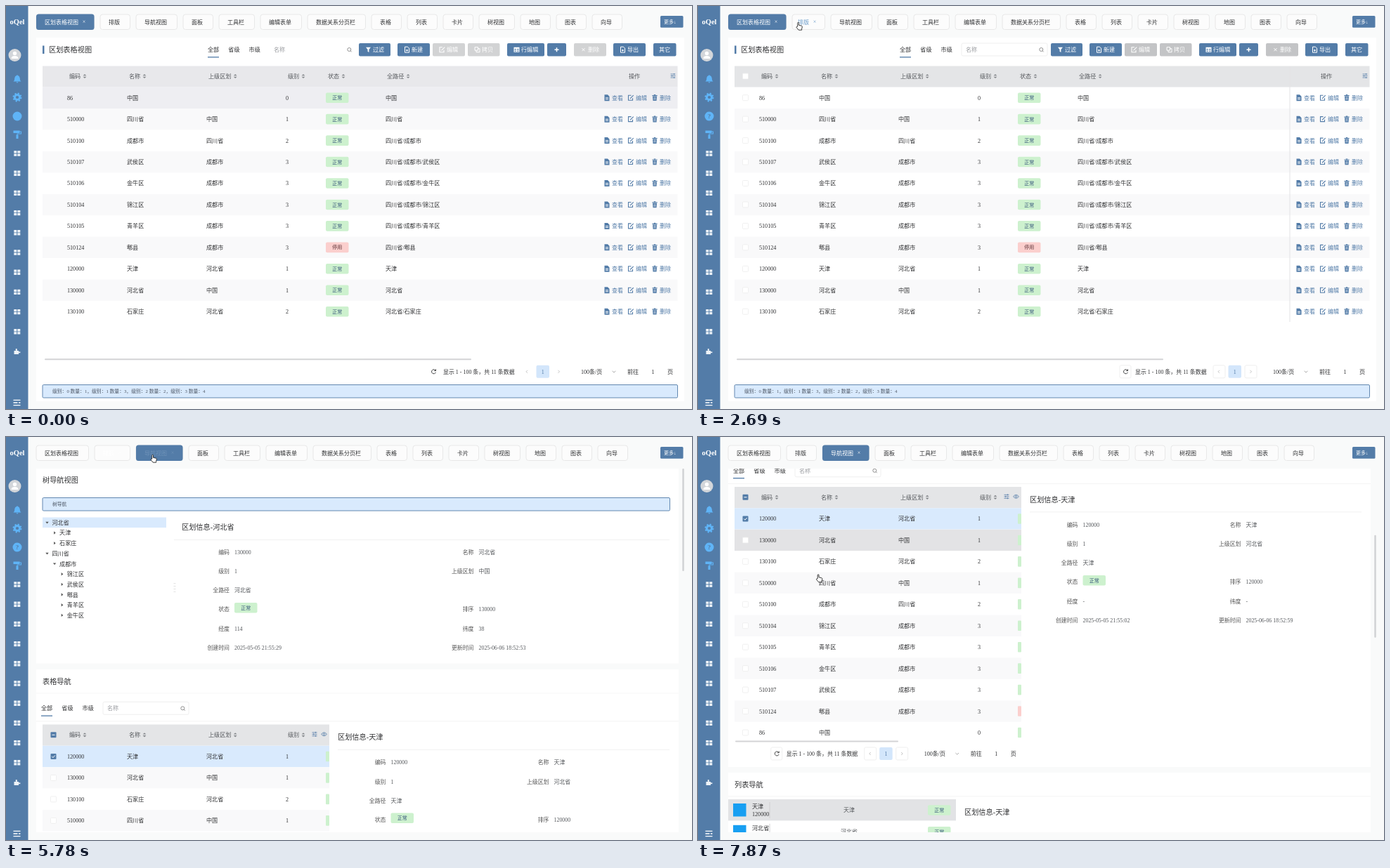
These frames come from a looping animation (976 px wide and 574 px high, 8 s). An HTML page:

```html
<!DOCTYPE html>
<html lang="zh-CN">
<head>
<meta charset="utf-8">
<title>区划管理</title>
<style>
html, body { margin: 0; width: 100%; height: 100%; overflow: hidden; background: #f9fafa; }
svg { display: block; width: 976px; height: 574px; font-family: "Liberation Serif", "Noto Sans CJK SC", "Noto Sans CJK", serif; }
text { white-space: pre; }
.washed .soft { opacity: 0; }
.washed .head { fill: #e8e8eb; }
.washed #topHover { fill: #eeeef2; }
.washed .off { opacity: .75; }
</style>
</head>
<body>
<svg id="stage" viewBox="0 0 976 574"></svg>
<script>
const LOOP = 8000;
const BLUE = '#537ca8', SKY = '#5fb4f7', INK = '#303133', PALE = '#d9eafd', GREY = '#e4e5e7';
const stage = document.getElementById('stage');

// ---- drawing helpers -------------------------------------------------
const icons = { // path, stroke width (0 = filled)
  doc: ['M-3.5-4.5h4.500l2.500 2.500v6.500h-7zM-2-.5h4v1h-4zM-2 1.500h4v1h-4z', 0],
  page: ['M-3-4h4l2 2v6h-6zM-1.500 1h3M0-.5v3', 1],
  edit: ['M2.500 .5v3h-6v-7h4M-1 1.200l4.700-4.700', 1.1],
  trash: ['M-3-2h6l-.5 6.300h-5zM-3.600-3.600h7.200v1.100h-7.200zM-1.200-4.600h2.400v1h-2.400zM-1.200-.8v3.800h.6v-3.800zM.6-.8v3.800h.6v-3.800z', 0],
  copy: ['M-3.500-3.500h4.500v4.500h-4.500zM1-1.500h2.500v5h-5v-2.500', 1],
  funnel: ['M-3.500-3.500h7l-2.600 3.300v4l-1.800-1.300v-2.700z', 0],
  table: ['M-4-3.500h8v7h-8zM-3-1.300v1.400h2.400v-1.400zM.6-1.300v1.400h2.400v-1.400zM-3 1.200v1.300h2.400v-1.300zM.6 1.200v1.300h2.400v-1.300z', 0],
  plus: ['M-3 0h6M0-3v6', 1.5],
  cross: ['M-2-2l4 4M2-2l-4 4', 1],
  search: ['M2.300 0a2.500 2.500 0 1 0-5 0a2.500 2.500 0 1 0 5 0M1.600 1.800l1.600 1.600', .8],
  refresh: ['M2.700-1.500a3 3 0 1 0 .2 2.500M3-3.400v2.200h-2.200', .9],
  lines: ['M-3.500-2.500h7M-3.500 0h7M-3.500 2.500h7M1.500-3.500v2M-1.500-1v2M1.500 1.500v2', .8],
  eye: ['M-4 0q4-5 8 0q-4 5-8 0M1.300 0a1.300 1.300 0 1 0-2.600 0a1.300 1.300 0 1 0 2.600 0', .8],
  sort: ['M-2.400-.8l2.400-2.300l2.400 2.300zM-2.400 .8l2.400 2.300l2.400-2.300z', 0],
  down: ['M-2.200-1h4.400l-2.200 2.600z', 0],
  right: ['M-1-2.200v4.400l2.600-2.200z', 0],
  chevL: ['M1-2l-2 2l2 2', .7],
  chevR: ['M-1-2l2 2l-2 2', .7],
  chevD: ['M-2.300-1l2.300 2.200l2.300-2.200', .7],
  tiles: ['M-4.500-3.700h4v3.300h-4zM.5-3.700h4v3.300h-4zM-4.500 .4h4v3.300h-4zM.5 .4h4v3.300h-4z', 0],
  bell: ['M-5.500 3.500q1.800-1.500 1.800-5q.3-3 2.700-3.500q1-1.500 2 0q2.400 .5 2.700 3.500q0 3.500 1.800 5zM-1.500 4.300h3q-1.500 2.400-3 0z', 0],
  roller: ['M-5.500-5.500h9v1h2.500v4h-5.500v1h1v5.500h-3v-5.500h1v-2h5.500v-2h-1.500v1.500h-9z', 0],
  puzzle: ['M-4-1h2.500q-1-3 .8-3q1.700 0 .8 3h2.400v1.500q2.500-.8 2.500 .8q0 1.500-2.500 .7v2h-6.500z', 0],
  menu: ['M-5-3.700h10M-5 0h6M-5 3.700h10M2.500 0h2.500', 1.3]
};
const icon = (name, x, y, color = BLUE) => {
  const [d, w] = icons[name];
  const paint = w ? `fill="none" stroke="${color}" stroke-width="${w}"` : `fill="${color}" fill-rule="evenodd"`;
  return `<path transform="translate(${x} ${y})" d="${d}" ${paint}/>`;
};
const rect = (x, y, w, h, fill, more = '') =>
  `<rect x="${x}" y="${y}" width="${w}" height="${h}" fill="${fill}" ${more}/>`;
const text = (x, y, s, size = 8.1, fill = INK, more = '') =>
  `<text x="${x}" y="${y + size * .37}" font-size="${size}" fill="${fill}" ${more}>${s}</text>`;
const MID = 'text-anchor="middle"', END = 'text-anchor="end"';
const hline = (x, x2, y, color = '#eee') => rect(x, y, x2 - x, .8, color);
const outline = (x, y, w, h) => rect(x, y, w, h, '#fff', 'rx="2" stroke="#ebebeb" stroke-width=".8" class="soft"');
const each = (list, fn) => list.map(fn).join('');

const badge = (x, y, off) => rect(x, y - 7.3, 32.5, 14.6, off ? '#fbcfcd' : '#cdf1ce', 'rx="2"')
  + text(x + 16.2, y, off ? '停用' : '正常', 7, off ? '#5b3036' : '#35557a', MID);
const checkbox = (y, mark) => mark
  ? rect(63.5, y - 4, 8, 8, BLUE, 'rx="1"') + `<path d="${mark === 'minus' ? `M65.500 ${y}h4` : `M65.300 ${y}l1.600 1.700l2.800-3.200`}" fill="none" stroke="#fff"/>`
  : rect(63.5, y - 4, 8, 8, '#fff', 'rx="1" stroke="#ececec" stroke-width=".8" class="soft"');
const button = (x, w, label, name, off) => rect(x, 53, w, 18.5, off ? '#c3c4c6' : BLUE, `rx="2" ${off ? 'class="off"' : ''}`)
  + (name ? icon(name, label ? x + 13.5 : x + w / 2, 62.2, '#fff') : '')
  + text(name ? x + 20 : x + 8, 62, label, 8.1, '#fff');
const filters = (x, y, boxX, boxW) => each(['全部', '省级', '市级'], (s, i) => text(x + 29.3 * i, y, s))
  + rect(x, y + 10.2, 16, 1.3, BLUE)
  + outline(boxX, y - 9, boxW, 18) + text(boxX + 6, y, '名称', 8, '#9a9ca0') + icon('search', boxX + boxW - 8.5, y, '#777');
const headers = (y, list) => each(list, ([x, s]) => text(x, y, s, 8.1, '#55585c') + icon('sort', x + s.length * 8.1 + 5.8, y, '#85888c'));
const COLUMNS = [[90, '编码'], [175, '名称'], [288, '上级区划'], [401, '级别'], [458, '状态'], [542, '全路径']];
const cells = ([code, name, parent, level], y) => text(87, y, code) + text(172, y, name)
  + text(285, y, parent === '-' ? '' : parent) + text(400, y, level, 8.1, INK, MID);
const pager = (dx, y) => `<g transform="translate(${dx} ${y})">`
  + outline(600, -9, 16, 18) + icon('refresh', 608.5, 0, INK) + text(622, 0, '显示 1 - 100 条，共 11 条数据', 7.95)
  + outline(733, -9, 17, 18) + icon('chevL', 741, 0, '#aaa') + rect(754.5, -9, 18.5, 18, '#d3e6fb', 'rx="2"')
  + text(763.8, 0, '1', 8, BLUE, MID) + outline(778, -9, 17, 18) + icon('chevR', 786.5, 0, '#aaa')
  + text(818, 0, '100条/页', 8) + icon('chevD', 865, 0, '#888') + text(884, 0, '前往') + text(920.5, 0, '1', 8, INK, MID)
  + text(941, 0, '页') + '</g>';
const notice = (y, w, s) => rect(52, y, w, 18.5, PALE, `rx="1.5" stroke="${BLUE}" stroke-width=".9"`) + text(66, y + 9.3, s, 6.8, '#4b5563');
const FIELDS = ['编码', '名称', '级别', '上级区划', '全路径', '', '状态', '排序', '经度', '纬度', '创建时间', '更新时间'];
const form = (y, left, right, values) => each(FIELDS, (label, i) => {
  const x = i % 2 ? right : left, row = y + (i >> 1) * 27.15;
  return text(x, row, label, 7.9, '#555', END)
    + (label === '状态' ? badge(x + 7, row - 2.2) : text(x + 7, row, values[i], 7.9, '#55585c'));
});

// ---- data ------------------------------------------------------------
const regions = `86 中国 - 0 中国
510000 四川省 中国 1 四川省
510100 成都市 四川省 2 四川省/成都市
510107 武侯区 成都市 3 四川省/成都市/武侯区
510106 金牛区 成都市 3 四川省/成都市/金牛区
510104 锦江区 成都市 3 四川省/成都市/锦江区
510105 青羊区 成都市 3 四川省/成都市/青羊区
510124 郫县 成都市 3 四川省/郫县
120000 天津 河北省 1 天津
130000 河北省 中国 1 河北省
130100 石家庄 河北省 2 河北省/石家庄`.split('\n').map(s => s.split(' '));
const sorted = [...regions].sort((a, b) => a[0] < b[0] ? -1 : 1);
const stopped = r => r[0] === '510124';
const PITCH = 30.45;

// ---- views -----------------------------------------------------------
const sidebar = () => rect(0, 0, 31.5, 574, BLUE) + text(16, 22, 'oQel', 10.5, '#fff', MID + ' font-weight="bold"')
  + '<circle cx="12.5" cy="70" r="9" fill="#d3d6da"/><circle cx="12.5" cy="67.500" r="2.700" fill="#fff"/><path d="M7.500 75q0-4 5-4t5 4z" fill="#fff"/>'
  + icon('bell', 16, 104, SKY)
  + `<circle cx="16" cy="130" r="3.600" fill="none" stroke="${SKY}" stroke-width="3"/><circle cx="16" cy="130" r="5.500" fill="none" stroke="${SKY}" stroke-width="2" stroke-dasharray="2.160"/>`
  + `<circle cx="16" cy="157" r="6.500" fill="${SKY}"/>` + text(16, 157, '?', 9, BLUE, MID + ' font-weight="bold" class="soft"')
  + icon('roller', 16, 183, SKY)
  + each([...Array(10).keys()], i => icon('tiles', 15.8, 210 + 28.2 * i, '#eef3f8'))
  + icon('puzzle', 15.5, 492, '#eef3f8') + icon('menu', 15.5, 565, '#fff');

const tableView = () => rect(43, 45, 922, 518, '#fff') + rect(52, 56.5, 2.5, 11.5, BLUE) + text(61, 62.3, '区划表格视图', 10.2)
  + filters(287, 62, 375, 122)
  + button(502, 45, '过滤', 'funnel') + button(557, 46, '新建', 'page') + button(607, 46, '编辑', 'edit', 1)
  + button(657, 45.5, '拷贝', 'copy', 1) + button(713, 53, '行编辑', 'table') + button(770, 27, '', 'plus')
  + button(808, 46, '删除', 'cross', 1) + button(864, 46, '导出', 'page') + button(921, 32.5, '其它')
  + rect(52, 85.5, 903.5, 30, GREY, 'class="head"') + checkbox(100)
  + each(regions, (r, i) => i % 2 ? rect(52, 115.5 + PITCH * i, 903.5, PITCH, '#f9f9fa') : '')
  + rect(52, 115.5, 903.5, PITCH, '#e3e3e5', 'id="topHover"')
  + headers(100, COLUMNS) + text(886, 100, '操作', 8.1, '#55585c') + icon('lines', 949, 99.5)
  + rect(841.5, 86, 1, 364, '#e3e3e6', 'class="soft"')
  + each(regions, (r, i) => {
    const y = 130.7 + PITCH * i;
    return checkbox(y) + cells(r, y) + badge(455, y, stopped(r)) + text(540, y, r[4])
      + each([['doc', '查看'], ['edit', '编辑'], ['trash', '删除']], ([name, s], k) =>
        icon(name, 855 + 34 * k, y) + text(862 + 34 * k, y, s, 8, BLUE));
  })
  + rect(55, 502.3, 607, 2, '#d3d4d6', 'rx="1"') + pager(0, 520.8)
  + notice(539.5, 903.5, '级别：0 数量：1，级别：1 数量：3，级别：2 数量：2，级别：3 数量：4');

const layoutView = () => {
  const box = (x, y, x2, y2, s, ty = (y + y2) / 2) => rect(x, y, x2 - x, y2 - y, '#e6e7e9') + text((x + x2) / 2, ty, s, 7.8, '#555', MID);
  const title = (y, s) => text(163, y, '分组容器：' + s, 10.1, '#222', 'font-weight="bold"') + hline(160, 958, y + 13.5, '#ebe5c4');
  return rect(43, 45, 922, 517.5, '#d0dde3') + text(504, 51, 'header区', 7.8, '#555', MID) + text(503.5, 557.3, 'bottom区', 7.8, '#555', MID)
    + box(48, 90, 152, 316, '上') + box(48, 328, 152, 552, '下') + hline(43, 156, 320.5, '#b4c0c6')
    + rect(156, 90, 807.5, 462, '#f5efc7')
    + title(104, '栅格布局') + box(165, 127, 428, 230, '栅格4/12', 132) + box(432.5, 127, 691, 230, '栅格4/12', 132) + box(695, 127, 953.5, 230, '栅格4/12', 132)
    + title(253.5, 'flex布局') + box(165, 276, 854, 379, 'flex: 宽度自动') + box(858.5, 276, 953.5, 379, 'flex：宽度200px')
    + title(403, '左右分割可拖动宽度') + box(165, 426, 555, 529, '左') + box(567.5, 426, 953.5, 473, '上') + box(567.5, 485.5, 953.5, 529, '下')
    + rect(559.5, 426, .8, 106, '#d4cfae') + rect(562.3, 426, .8, 106, '#e0dab8') + hline(563, 960, 477.5, '#d4cfae') + hline(563, 960, 480.5, '#e0dab8')
    + `<g clip-path="url(#fold)">${text(161, 553.5, '分组 — — 分组', 9, '#333', 'font-weight="bold"')}</g>`
    + rect(962.3, 90, 2.4, 233, '#c3c6c0', 'rx="1"');
};

const TREE = '0d河北省 1r天津 1r石家庄 0d四川省 1d成都市 2r锦江区 2r武侯区 2r郫县 2r青羊区 2r金牛区'.split(' ');
const naviView = () => {
  const listItem = (y, name, code, fill) => rect(43, y, 324, 30.5, fill) + rect(50, y + 6, 18.5, 18.5, '#189ff2')
    + text(77, y + 10, name) + text(77, y + 21, code) + rect(101.5, y + 4, 1, 23, '#cfd0d2')
    + text(215, y + 15.5, name, 8, '#55585c', MID) + badge(327, y + 15.5);
  return rect(43, 40, 914, 282.5, '#fff') + text(52, 61.3, '树导航视图', 10.2) + notice(86.5, 892.5, '树导航')
    + rect(52, 114.5, 176, 14.6, PALE)
    + each(TREE, (s, i) => {
      const x = 58.5 + 10.6 * s[0], y = 121.8 + 14.68 * i;
      return icon(s[1] === 'd' ? 'down' : 'right', x, y, '#555') + text(x + 7, y, s.slice(2));
    })
    + each([0, 1, 2, 3], i => rect(238.5, 208 + 4 * i, 3, .8, '#ddd'))
    + text(250, 128, '区划信息-河北省', 10.2) + hline(239, 944, 146)
    + form(164, 318, 665.5, ['130000', '河北省', '1', '中国', '河北省', '', '', '130000', '114', '38', '2025-05-05 21:55:29', '2025-06-06 18:52:53'])
    + rect(43, 331, 914, 477.5, '#fff') + text(52, 348, '表格导航', 10.2) + hline(43, 957, 364.5, '#f5f5f5')
    + filters(50, 386.3, 138, 122) + hline(43, 957, 404.5, '#f2f2f2')
    + rect(52, 409.5, 408, 30.2, GREY) + checkbox(424.3, 'minus') + headers(424.3, COLUMNS.slice(0, 4)) + icon('lines', 439, 423.3) + icon('eye', 452.5, 423.3)
    + each(sorted, (r, i) => {
      const y = 455 + PITCH * i;
      return rect(52, y - 15.2, 408, PITCH, i ? i % 2 ? '#f9f9fa' : '#fff' : PALE)
        + (i === 1 ? rect(52, y - 15.2, 408, PITCH, '#e3e3e5', 'id="rowHover"') : '')
        + checkbox(y, i ? '' : 'tick') + cells(r, y) + rect(455, y - 7.3, 5, 14.6, stopped(r) ? '#fbcfcd' : '#cdf1ce', 'rx="1"');
    })
    + rect(53, 771, 232, 2, '#d3d4d6', 'rx="1"') + pager(-496.3, 789.5)
    + text(472, 427.3, '区划信息-天津', 10.2) + hline(472, 944, 445)
    + form(463.5, 540.5, 772.5, ['120000', '天津', '1', '河北省', '天津', '', '', '120000', '-', '-', '2025-05-05 21:55:02', '2025-06-06 18:52:59'])
    + rect(43, 816.5, 914, 300, '#fff') + text(52, 833.5, '列表导航', 10.2) + hline(43, 957, 850, '#f2f2f2')
    + listItem(854.5, '天津', '120000', '#e2e3e5') + listItem(885.3, '河北省', '130000', '#fff') + text(379, 872.7, '区划信息-天津', 10.2);
};

const tabNames = '区划表格视图 排版 导航视图 面板 工具栏 编辑表单 数据关系分页栏 表格 列表 卡片 树视图 地图 图表 向导'.split(' ');
const tabBar = () => each(tabNames, s => '<g class="tab">'
  + rect(0, 12, 10, 21.5, '#fcfcfc', 'rx="3.5" stroke="#e6e6e6" stroke-width=".9"') + rect(0, 11.5, 10, 22.5, BLUE, 'rx="3.5"')
  + text(0, 22.8, s, 8) + text(0, 22.5, '×', 8, INK, MID) + '</g>')
  + rect(931, 14, 32.5, 16.8, BLUE, 'rx="1.5"') + text(936, 22, '更多↓', 7, '#fff');

stage.innerHTML = '<defs><clipPath id="pane"><rect x="40" y="45" width="930" height="518"/></clipPath>'
  + '<clipPath id="fold"><rect x="156" y="540" width="800" height="12"/></clipPath></defs>'
  + rect(0, 0, 976, 574, '#f9fafa') + sidebar() + tabBar()
  + `<g class="view">${tableView()}</g><g class="view">${layoutView()}</g>`
  + `<g class="view"><g clip-path="url(#pane)"><g id="scroller">${naviView()}</g></g>${rect(962.3, 45, 2.4, 146, '#d0d1d3', 'rx="1" id="thumb"')}</g>`
  + '<path id="hand" d="M2.200 6.200V1.300q0-1 .9-1t.9 1v3l3.800 .9q1.200 .4 1 1.600l-.7 2.700v1.700h-4.400l-3-3.500q-.7-1 .2-1.300z" fill="#fff" stroke="#222" stroke-width=".9"/>'
  + '<path id="arrow" d="M0 0v8.500l2-1.700l1.400 3l1.400-.6l-1.300-3h2.500z" fill="#111" stroke="#fff" stroke-width=".4"/>';

// ---- motion ----------------------------------------------------------
// Each key is [time, ...values]; values are eased between keys and held outside them.
const track = (keys, t) => {
  const n = keys.findIndex(k => k[0] > t);
  if (n <= 0) return (n ? keys[keys.length - 1] : keys[0]).slice(1);
  const a = keys[n - 1], b = keys[n], p = (t - a[0]) / (b[0] - a[0]), e = p * p * (3 - 2 * p);
  return a.slice(1).map((v, i) => v + (b[i + 1] - v) * e);
};

const dark = [48, 49, 51], white = [255, 255, 255], hot = [105, 155, 202];
// extra width, text inset, blue fill, text colour
const idle = [0, 12, 0, ...dark], hovered = [4, 8, 0, ...hot], active = [8, 12, 1, ...white];
const tabKeys = [
  [[3010, ...active], [3260, ...idle]],
  [[2590, ...idle], [2690, ...hovered], [3010, ...hovered], [3260, ...active], [5779, ...active], [5780, 8, 12, 0, ...white], [6080, ...idle]],
  [[4750, ...idle], [4980, ...hovered], [5779, ...hovered], [5780, 8, 12, 1, 110, 146, 184], [6080, ...active]]
];
// x, y, hand shape
const cursorKeys = [[370, 505, 132, 0], [780, 475.5, 104.5, 1], [1100, 468, 96, 1], [2270, 468, 96, 1], [2690, 139.5, 23, 1],
  [4140, 139.5, 23, 1], [4490, 206, 108, 0], [4750, 206, 108, 0], [4980, 205.5, 25, 1], [6080, 205.5, 25, 1], [6530, 169.5, 186.5, 0],
  [7440, 169.5, 186.5, 0], [7870, 168, 195.5, 1]];
const scrollKeys = [[6630, 0], [6910, 113], [7439, 113], [7440, 135.5], [7870, 338.5]];

const byId = id => document.getElementById(id);
const show = (el, on) => el.setAttribute('visibility', on ? 'visible' : 'hidden');
const move = (el, x, y) => el.setAttribute('transform', `translate(${x} ${y})`);
const views = [...stage.querySelectorAll('.view')], tabs = [...stage.querySelectorAll('.tab')];

function drawTabs(t) {
  let x = 43;
  tabs.forEach((tab, i) => {
    const [extra, inset, blue, ...rgb] = tabKeys[i] ? track(tabKeys[i], t) : idle;
    const [frame, fill, label, close] = tab.children;
    const textWidth = tabNames[i].length * 8, width = textWidth + 26.5 + extra;
    const color = `rgb(${rgb.map(Math.round)})`;
    move(tab, x, 0);
    frame.setAttribute('width', width);
    fill.setAttribute('width', width);
    fill.setAttribute('opacity', blue);
    label.setAttribute('x', inset);
    label.setAttribute('fill', color);
    close.setAttribute('x', inset + textWidth + 8);
    close.setAttribute('fill', color);
    close.setAttribute('opacity', Math.min(1, extra / 4));
    x += width + 8.5;
  });
}

function draw(now) {
  const t = now % LOOP;
  const current = t < 3010 ? 0 : t < 5780 ? 1 : 2;
  views.forEach((v, i) => v.style.display = i === current ? '' : 'none');
  stage.classList.toggle('washed', t < 130);
  drawTabs(t);

  const [scroll] = track(scrollKeys, t);
  move(byId('scroller'), 0, -scroll);
  move(byId('thumb'), 0, scroll * .28);
  show(byId('topHover'), t < 1100);
  show(byId('rowHover'), t > 7700);

  const [x, y, hand] = track(cursorKeys, t);
  for (const id of ['hand', 'arrow']) {
    move(byId(id), x, y);
    show(byId(id), t >= 370 && (id === 'hand') === (hand > .5));
  }
  requestAnimationFrame(() => draw(performance.now() - start));
}
const start = performance.now();
draw(0);
</script>
</body>
</html>
```
